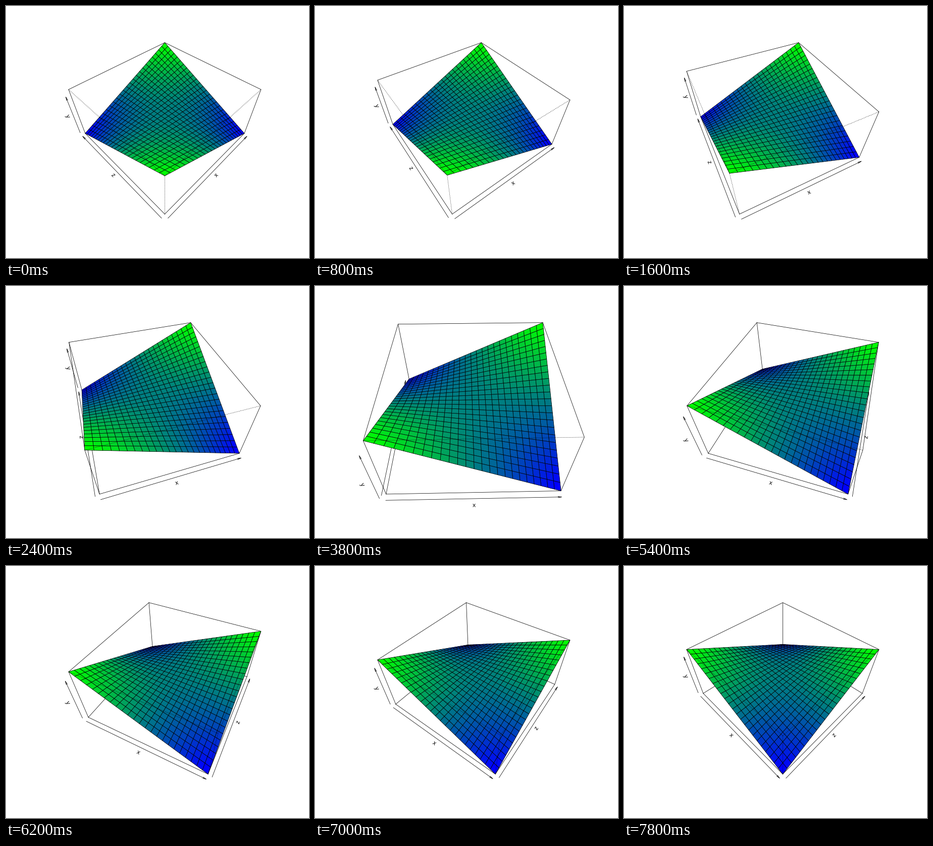
A matplotlib script for the animation above (8000 ms loop, 600 by 500 pixels).

```python
import itertools

import numpy as np
import matplotlib.pyplot as plt
from matplotlib.animation import FuncAnimation
from matplotlib.collections import LineCollection, PathCollection, PolyCollection
from matplotlib.textpath import TextPath
from matplotlib.transforms import Affine2D

W, H, DPI = 600, 500, 100
FRAMES, STEP_MS = 40, 200
PX = 72 / DPI
LINE = 0.75 * PX

# plot region inside the margins, shrunk by 4 % on each side
CENTER = np.array([314.4, 242.8])
ROOM = np.array([510.72, 367.52]) / 1.08

TILT = np.sqrt(0.5)           # sine and cosine of 45 degrees
EYE = 2 + np.sqrt(3)
CELLS = 24
TICK = 0.06
VERT_RANGE = (-0.968, 0.708)  # vertical arrow ends at round values

CORNERS = np.array(list(itertools.product((-1, 1), repeat=3)), float)
FACES = [(0, 1, 5, 4), (2, 6, 7, 3), (0, 2, 3, 1),
         (4, 5, 7, 6), (0, 4, 6, 2), (1, 3, 7, 5)]


def project(points, theta):
    """Perspective image of box points and their distance from the eye."""
    x, y, z = np.moveaxis(np.asarray(points, float), -1, 0)
    c, s = np.cos(theta), np.sin(theta)
    across, toward, up = x * c + y * s, x * s - y * c, z / 2
    dist = EYE - TILT * (up + toward)
    return np.stack([across, TILT * (up - toward)], -1) / dist[..., None], dist


def make_view(theta):
    flat, _ = project(CORNERS, theta)
    low, high = flat.min(0), flat.max(0)
    scale = (ROOM / (high - low)).min()

    def view(points):
        p, dist = project(points, theta)
        return CENTER + (p - (low + high) / 2) * scale * (1, -1), dist
    return view


def build_surface():
    t = np.linspace(-1, 1, CELLS + 1)
    x, y = np.meshgrid(t, t, indexing="ij")
    g = np.stack([x, y, x * y], -1)
    quads = np.stack([g[:-1, :-1], g[1:, :-1], g[1:, 1:], g[:-1, 1:]], 2)
    quads = quads.reshape(-1, 4, 3)
    level = quads[:, :, 2].mean(1)
    level = (level - level.min()) / np.ptp(level)
    shade = np.minimum(np.floor(level * 100), 99) / 99
    return quads, np.stack([0 * shade, shade, 1 - shade], -1)


def box_edges(pts):
    """Edges of faces turned away from the eye, then the remaining ones."""
    back, front = set(), set()
    for face in FACES:
        a, b, c = pts[list(face[:3])]
        d, e = b - a, c - b
        group = back if d[0] * e[1] - d[1] * e[0] < 0 else front
        for i, j in zip(face, face[1:] + face[:1]):
            group.add((min(i, j), max(i, j)))
    pick = lambda edges: [pts[list(e)] for e in sorted(edges)]
    return pick(back), pick(front - back)


def axes_3d(pts):
    """Start, end and outward direction of the three axis arrows."""
    floor = [0, 2, 4, 6]
    near = CORNERS[max(floor, key=lambda i: pts[i, 1])]
    left = CORNERS[min(floor, key=lambda i: pts[i, 0])]
    lo, hi = VERT_RANGE
    return [
        ("x", (-1, near[1], -1), (1, near[1], -1), (0, near[1], -1)),
        ("z", (near[0], -1, -1), (near[0], 1, -1), (near[0], 0, -1)),
        ("y", (left[0], left[1], lo), (left[0], left[1], hi),
         (left[0], left[1], 0)),
    ]


def arrow(a, b):
    back = np.arctan2(*(a - b)[::-1])
    tips = [b + 7.2 * np.array([np.cos(back + k), np.sin(back + k)])
            for k in np.radians([10, -10])]
    return [np.array([a, b]), np.array([tips[0], b, tips[1]])]


def label(char, pos, a, b):
    d = b - a if b[0] > a[0] else a - b
    place = Affine2D().translate(-3, -4.15).scale(1, -1)
    place.rotate(np.arctan2(d[1], d[0])).translate(*pos)
    return place.transform_path(GLYPHS[char])


GLYPHS = {c: TextPath((0, 0), c, size=12, prop={"family": "Liberation Sans"})
          for c in "xyz"}
QUADS, COLORS = build_surface()

fig = plt.figure(figsize=(W / DPI, H / DPI), dpi=DPI, facecolor="white")
ax = fig.add_axes([0, 0, 1, 1])
ax.set(xlim=(0, W), ylim=(H, 0))
ax.axis("off")

style = dict(colors="black", linewidths=LINE, capstyle="round", joinstyle="round")
solid = ax.add_collection(LineCollection([], zorder=1, **style))
names = ax.add_collection(PathCollection([], facecolors="black", linewidths=0,
                                         zorder=2))
names.set_transform(ax.transData)
surface = ax.add_collection(PolyCollection([], edgecolors="black", linewidths=LINE,
                                           joinstyle="round", zorder=3))
dotted = ax.add_collection(LineCollection([], linestyles=[(0, (1, 3))],
                                          zorder=4, **style))


def draw(i):
    view = make_view(np.radians(-45 + 90 * i / (FRAMES - 1)))
    pts, _ = view(CORNERS)
    lines, front = box_edges(pts)
    texts = []
    for char, start, end, out in axes_3d(pts):
        start, end, out = map(np.array, (start, end, out))
        (a, b, mid), _ = view([start + TICK * out, end + TICK * out,
                               (start + end) / 2 + 2 * TICK * out])
        lines += arrow(a, b)
        texts.append(label(char, mid, a, b))
    solid.set_segments(lines)
    dotted.set_segments(front)
    names.set_paths(texts)

    quads, dist = view(QUADS)
    order = np.argsort(-dist.max(1), kind="stable")
    surface.set_verts(quads[order])
    surface.set_facecolor(COLORS[order])
    return solid, names, surface, dotted


anim = FuncAnimation(fig, draw, frames=FRAMES, interval=STEP_MS,
                     init_func=lambda: draw(0), repeat=True, repeat_delay=0)
plt.show()
```
